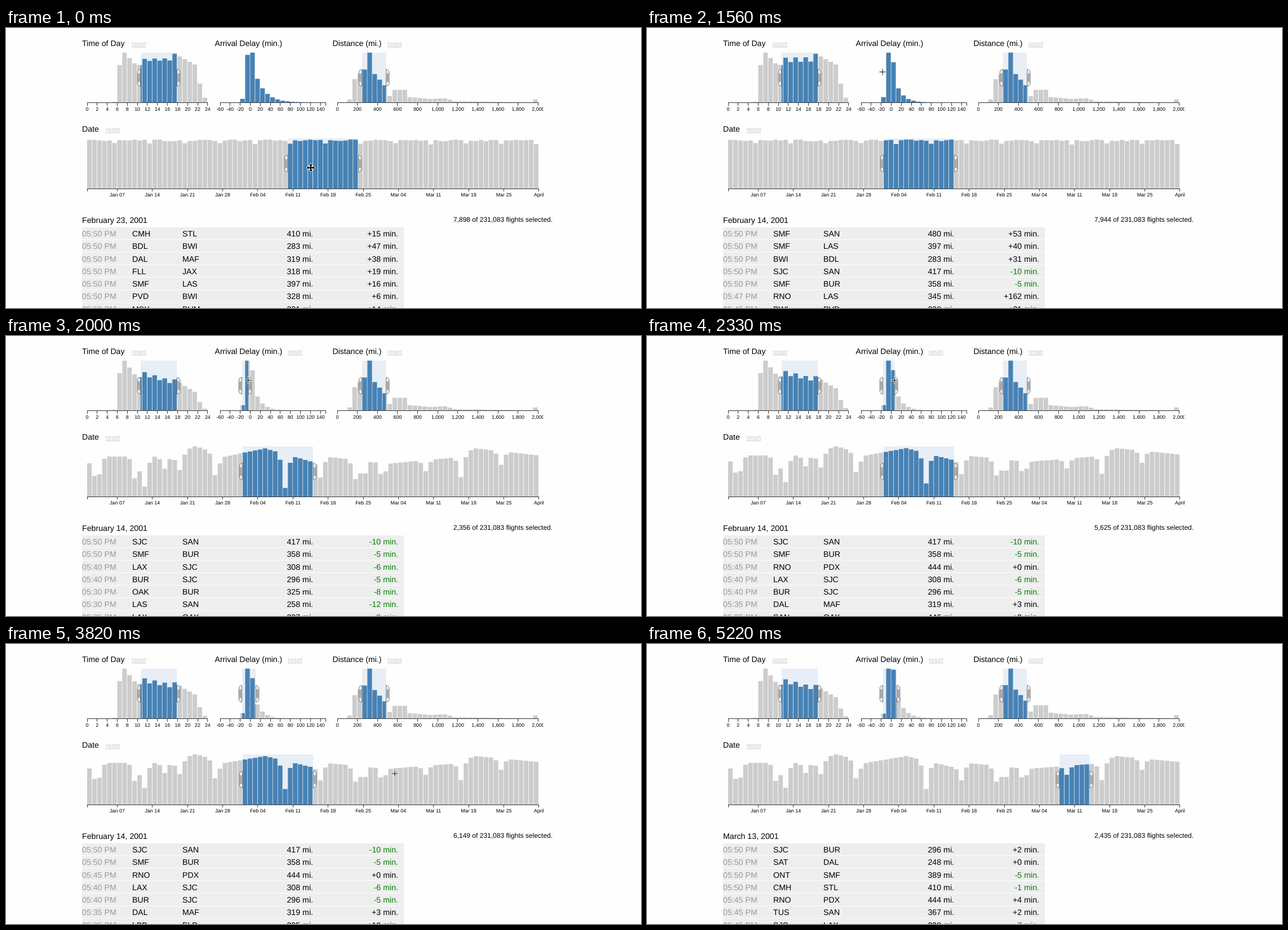
Animation, 1127 px wide and 497 px high, one loop 6190 ms. Source, as an HTML page:

```html
<!DOCTYPE html>
<html lang="en">
<head>
<meta charset="utf-8">
<title>Flight filter</title>
<style>
html, body { margin: 0; width: 100%; height: 100%; overflow: hidden; background: #fefefe; }
svg { display: block; width: 100%; height: 100%; font: 14.2px "Liberation Sans", Arial, sans-serif; text-rendering: geometricPrecision; }
.title { font-size: 14.1px; }
.reset { font-size: 11.6px; fill: #ccc; text-decoration: underline; }
.tick { font-size: 10px; text-anchor: middle; }
.axis { fill: none; stroke: #333; shape-rendering: crispEdges; vector-effect: non-scaling-stroke; }
.back { fill: #ccc; }
.fore { fill: steelblue; }
.extent { fill: steelblue; fill-opacity: .125; }
.handle { fill: #eee; stroke: #666; }
.count { font-size: 12px; }
.row rect { fill: #eee; }
.time { fill: #999; }
.right { text-anchor: end; }
.cursor { stroke: #fff; stroke-width: 1.6; paint-order: stroke; }
</style>
</head>
<body>
<svg id="stage" viewBox="0 0 1127 497" preserveAspectRatio="none"></svg>
<script>
const LOOP = 6190, SCALE = .891, FULL = 89;
const stage = document.getElementById('stage');

function add(parent, tag, attrs = {}, text) {
  const el = document.createElementNS('http://www.w3.org/2000/svg', tag);
  for (const k in attrs) el.setAttribute(k, attrs[k]);
  if (text !== undefined) el.textContent = text;
  parent.appendChild(el);
  return el;
}
const show = (el, on) => el.setAttribute('visibility', on ? 'visible' : 'hidden');
const mix = (a, b, p) => a.map((v, i) => v + (b[i] - v) * p);
const bell = (x, mid, width) => Math.exp(-(((x - mid) / width) ** 2));
const noise = i => Math.abs(Math.sin(i * 127.1 + 3) * 43758.5) % 1;
const bars = (n, height) => Array.from({ length: n }, (_, i) => Math.min(FULL, height(i)));
const range = (a, b, step, label = v => v.toLocaleString('en-US')) =>
  Array.from({ length: Math.floor((b - a) / step) + 1 }, (_, i) => [a + i * step, label(a + i * step)]);

// Straight lines through [x, y] points, zero before the first
function curve(points) {
  return x => {
    const i = points.findIndex(p => p[0] >= x);
    if (i < 0) return points[points.length - 1][1];
    const [x1, y1] = points[i];
    if (x === x1) return y1;
    if (!i) return 0;
    const [x0, y0] = points[i - 1];
    return y0 + (y1 - y0) * (x - x0) / (x1 - x0);
  };
}

// Bar heights. Punctual flights thin out as the day goes on.
const dayShape = curve([[5, 2], [6, 67], [7, 89], [9, 70], [10, 67], [11, 76], [16, 77], [17, 87], [21, 68], [22, 34], [23, 9]]);
const time = (fade, wave) => bars(24, i => {
  const ripple = i > 10 && i < 17 ? wave * (i % 2 ? 1 : -1) : 0;
  return (dayShape(i) + ripple) * (1 - fade * Math.max(0, i - 7));
});

const delay = (head, tail, decay, hump = 0) => bars(21, i =>
  i < 4 ? 0 : i < 7 ? head[i - 4] : tail * decay ** (i - 7) + .6 + hump * bell(i, 17, 2.5));
const delays = {
  start: delay([7, 85, 89], 42, .6),
  moved: delay([10, 89, 72], 25, .5),
  day: delay([5, 78, 89], 32, .47, 4),
  week: delay([9, 89, 87], 36, .52)
};

const reach = curve([[2, 6], [3, 42], [5, 59], [6, 89], [7, 51], [9, 31], [10, 12], [11, 23], [13, 23], [14, 10], [18, 7], [21, 8], [23, 3], [38, 1], [39, 6]]);
const dist = power => bars(40, i => FULL * (reach(i) / FULL) ** power);

// Day 0 is a Monday; Saturdays are quiet
const allDays = bars(90, i => 87 - 3 * noise(i) - (i % 7 === 5 ? 6 : 0));

const trend = curve([[0, 65], [4, 74], [17, 74], [21, 90], [27, 74], [35, 86], [44, 67], [48, 73], [60, 64], [72, 72], [77, 86], [89, 76]]);
const storms = [[1.5, 32], [9.2, 34], [11, 44], [15, 18], [18, 24], [25.2, 35], [39, 50], [46, 27],
  [53, 28], [54.6, 24], [58.4, 22], [67, 16], [74, 34], [82, 20]];
const punctual = k => bars(90, i => {
  const loss = storms.reduce((sum, [day, depth]) => sum + depth * bell(i, day, .8), 0);
  return FULL - (FULL - trend(i) + loss) * k;
});

// Flights: time from to miles delay
const parse = s => s.split('; ').map(line => line.split(' '));
const late23 = parse('05:50 CMH STL 410 +15; 05:50 BDL BWI 283 +47; 05:50 DAL MAF 319 +38; 05:50 FLL JAX 318 +19; 05:50 SMF LAS 397 +16; 05:50 PVD BWI 328 +6; 05:50 MSY BHM 321 +14');
const late14 = parse('05:50 SMF SAN 480 +53; 05:50 SMF LAS 397 +40; 05:50 BWI BDL 283 +31; 05:50 SJC SAN 417 -10; 05:50 SMF BUR 358 -5; 05:47 RNO LAS 345 +162; 05:45 BWI PVD 328 +21');
const good14 = parse('05:50 SJC SAN 417 -10; 05:50 SMF BUR 358 -5; 05:45 RNO PDX 444 +0; 05:40 LAX SJC 308 -6; 05:40 BUR SJC 296 -5; 05:35 DAL MAF 319 +3; 05:35 LBB ELP 295 +10; 05:35 SAN OAK 446 +0; 05:30 OAK BUR 325 -8; 05:30 LAS SAN 258 -12; 05:25 LAX OAK 337 -9');
const mar8 = parse('05:50 ONT SMF 389 -1; 05:50 SJC SAN 417 +5; 05:50 CMH STL 410 +0; 05:50 SAT DAL 248 +0; 05:50 HOU HRL 276 -3; 05:49 LBB ELP 295 +7; 05:48 MDW BNA 395 -7');
const mar13 = parse('05:50 SJC BUR 296 +2; 05:50 SAT DAL 248 +0; 05:50 ONT SMF 389 -5; 05:50 CMH STL 410 -1; 05:45 RNO PDX 444 +4; 05:45 TUS SAN 367 +2; 05:45 SJC LAX 308 -7');

// Each step holds until the next; unset fields carry over
const none = { time: [], dist: [], rows: [], count: 0 };
const slide = (t, p, rows, count) => ({
  t, rows, count, cursor: ['move', 541 - 78 * p, 248 + 2 * p], days: [40 - 9 * p, 54 - 9 * p],
  time: time(0, 2 + 2 * p), delay: mix(delays.start, delays.moved, p), dist: dist(1), date: allDays
});
const stretch = (t, end, k, count, kind = 'cross') => ({
  t, count, cursor: [kind, 380 + (end + 60) * SCALE, 78.5], span: [-16.2, end],
  time: time(.026 + .05 * (k - 1), 4), dist: dist(1), date: punctual(k),
  rows: good14.filter(r => +r[4] < end)
});
const week = (t, end, p, rows, count, x) => ({
  t, rows, count, cursor: ['resize', x, 240.5], days: [66, end],
  time: time(.042 - .011 * p, 4), delay: mix(delays.day, delays.week, p), dist: dist(.87 + .1 * p)
});
const hover = (t, kind, x, y) => ({ t, cursor: [kind, x, y] });

const steps = [
  slide(0, 0, late23, 7898),
  slide(600, 1 / 3, [...late23.slice(2, 6), ...late23.slice(0, 2), late23[6]], 7921),
  slide(780, 2 / 3, [...late14.slice(2, 5), ...late14.slice(0, 2), ...late14.slice(5)], 7935),
  slide(960, 1, late14, 7944),
  hover(1260, 'move', 451, 212),
  hover(1410, 'arrow', 431, 146),
  hover(1560, 'cross', 418, 78),
  { t: 1850, ...none, date: [], span: [-16.2, -16.2], cursor: ['cross', 430, 78] },
  stretch(2000, -4, 1.2, 2356),
  stretch(2180, 1, 1.12, 4387),
  stretch(2330, 6.5, 1.07, 5625),
  stretch(2480, 7.6, 1.05, 5790),
  stretch(2630, 8.6, 1.04, 5913),
  stretch(2780, 9.2, 1.03, 5985),
  stretch(2930, 9.8, 1.02, 6047),
  stretch(3070, 10.8, 1, 6149, 'resize'),
  hover(3370, 'cross', 470, 104),
  hover(3520, 'arrow', 540, 150),
  hover(3670, 'cross', 622, 202),
  hover(3820, 'cross', 690, 230),
  hover(3970, 'cross', 733, 241),
  { t: 4120, ...none, days: [66, 66], cursor: ['cross', 745, 241] },
  week(4270, 67, 0, mar8, 396, 771),
  week(4420, 70, .7, [mar8[1], mar8[3], mar13[2], mar8[0], ...mar13.slice(4)], 1612, 780),
  week(4600, 72, 1, mar13, 2435, 784),
  { t: 5220, cursor: null }
];
steps.forEach((s, i) => { steps[i] = { ...steps[i - 1], ...s }; });

// Charts
function barPath(heights, lo, hi) {
  return heights.map((h, i) => {
    const a = Math.max(i * 10, lo), b = Math.min(i * 10 + 9, hi);
    return h && b > a ? `M${a},100V${100 - h / FULL * 100}H${b}V100Z` : '';
  }).join('');
}

function handlePath(side) {
  const y = 100 / 3, e = +(side > 0), line = x => `M${x * side},${y + 8}V${2 * y - 8}`;
  return `M${.5 * side},${y}A6,6 0 0 ${e} ${6.5 * side},${y + 6}V${2 * y - 6}` +
    `A6,6 0 0 ${e} ${.5 * side},${2 * y}Z` + line(2.5) + line(4.5);
}

function chart(title, titleX, resetX, left, top, width, ticks, toX) {
  const id = 'clip' + width;
  add(stage, 'text', { class: 'title', x: titleX, y: top - 11.7 }, title);
  const reset = add(stage, 'text', { class: 'reset', x: resetX, y: top - 11.7 }, 'reset');
  add(add(stage, 'clipPath', { id }), 'rect', { x: -10, y: -10, height: 140, width: width + 20.5 });
  const frame = add(stage, 'g', { transform: `translate(${left},${top}) scale(${SCALE})`, 'clip-path': `url(#${id})` });
  const back = add(frame, 'path', { class: 'back' });
  const fore = add(frame, 'path', { class: 'fore' });
  const marks = ticks.map(([v]) => `M${toX(v)},100v6`).join('');
  add(frame, 'path', { class: 'axis', d: `M0,106V100H${width}V106${marks}` });
  for (const [v, label] of ticks) add(frame, 'text', { class: 'tick', x: toX(v), y: 116.1 }, label);
  const brush = add(frame, 'g');
  const extent = add(brush, 'rect', { class: 'extent', height: 100 });
  const handles = [-1, 1].map(side => add(brush, 'path', { class: 'handle', d: handlePath(side) }));

  return (heights, span) => {
    const [lo, hi] = span ? span.map(toX) : [0, width];
    back.setAttribute('d', barPath(heights, 0, width));
    fore.setAttribute('d', barPath(heights, lo, hi));
    show(brush, span);
    show(reset, span);
    extent.setAttribute('x', lo);
    extent.setAttribute('width', hi - lo);
    handles.forEach((h, i) => h.setAttribute('transform', `translate(${i ? hi : lo},0)`));
  };
}

const dayOf = n => new Date(2001, 0, n + 1);
const month = (d, style) => d.toLocaleString('en-US', { month: style });
const pad = n => String(n).padStart(2, '0');
const weekLabel = n => n === 90 ? 'April' : `${month(dayOf(n), 'short')} ${pad(dayOf(n).getDate())}`;

const drawTime = chart('Time of Day', 135, 223, 144, 43.7, 240, range(0, 24, 2), v => v * 10);
const drawDelay = chart('Arrival Delay (min.)', 370.5, 500, 380, 43.7, 210, range(-60, 140, 20), v => v + 60);
const drawDist = chart('Distance (mi.)', 579.5, 677, 588, 43.7, 400, range(0, 2000, 200), v => v / 5);
const drawDate = chart('Date', 135, 176.5, 144, 196, 900, range(6, 90, 7, weekLabel), v => v * 10);

// Table
const heading = add(stage, 'text', { x: 135, y: 345.5 });
const count = add(stage, 'text', { class: 'count', x: 794, y: 344 });
const rows = Array.from({ length: 7 }, (_, i) => {
  const g = add(stage, 'g', { class: 'row', transform: `translate(0,${353.8 + i * 22.28})` });
  add(g, 'rect', { x: 135, width: 571, height: 21.4 });
  const cells = [[135, 'time'], [224, ''], [313, ''], [545, 'right'], [696, 'right']]
    .map(([x, c]) => add(g, 'text', { x, y: 16.2, class: c }));
  return { g, cells };
});

function drawTable(s) {
  const last = dayOf(s.days[1] - 1);
  heading.textContent = s.rows.length ? `${month(last, 'long')} ${pad(last.getDate())}, 2001` : '';
  count.textContent = `${s.count.toLocaleString('en-US')} of 231,083 flights selected.`;
  rows.forEach(({ g, cells }, i) => {
    const r = s.rows[i];
    show(g, r);
    if (!r) return;
    [r[0] + ' PM', r[1], r[2], r[3] + ' mi.', r[4] + ' min.'].forEach((t, j) => { cells[j].textContent = t; });
    cells[4].setAttribute('fill', r[4][0] === '-' ? 'green' : '#000');
  });
}

const shapes = {
  move: 'M0-7L3-4H1V-1H4V-3L7,0L4,3V1H1V4H3L0,7L-3,4H-1V1H-4V3L-7,0L-4-3V-1H-1V-4H-3Z',
  resize: 'M-7,0L-3-4V-1H3V-4L7,0L3,4V1H-3V4Z',
  cross: 'M-.5-5.5h1v5h5v1h-5v5h-1v-5h-5v-1h5z',
  arrow: 'M0,0V12L3,9.3L5,14L7,13L5,8.6H9Z'
};
const pointer = add(stage, 'path', { class: 'cursor' });

function draw(s) {
  drawTime(s.time, [10.66, 17.85]);
  drawDelay(s.delay, s.span);
  drawDist(s.dist, [247, 484]);
  drawDate(s.date, s.days);
  drawTable(s);
  show(pointer, s.cursor);
  if (s.cursor) {
    const [kind, x, y] = s.cursor;
    pointer.setAttribute('d', shapes[kind]);
    pointer.setAttribute('transform', `translate(${x},${y})`);
  }
}

let current;
const start = performance.now();
function tick() {
  const t = (performance.now() - start) % LOOP;
  const step = steps.filter(s => s.t <= t).pop();
  if (step !== current) draw(current = step);
  requestAnimationFrame(tick);
}
tick();
</script>
</body>
</html>
```
